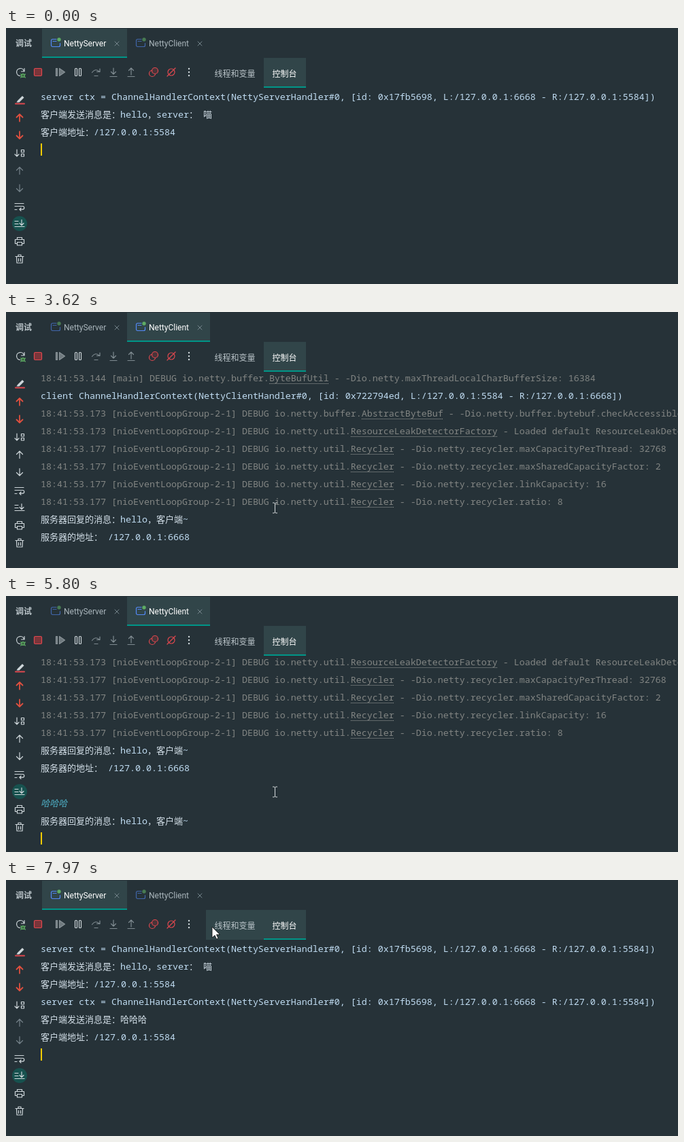
An HTML page that plays this animation: 988x377 px, repeating every 8 s.

```html
<!DOCTYPE html>
<html lang="zh-CN">
<head>
<meta charset="utf-8">
<style>
html, body { margin: 0; width: 100%; height: 100%; overflow: hidden; background: #263238; }
svg { position: absolute; left: 0; top: 0; fill: none; }
svg text { font: 12px Roboto, "Noto Sans CJK SC", sans-serif; fill: #bac4c9; }
#console { position: absolute; left: 0; top: 88px; width: 988px; height: 289px; overflow: hidden; }
.line { position: absolute; left: 51px; height: 26px; white-space: pre; color: #c0dcf2;
  font: 13.333px/26px "Noto Sans Mono", monospace; }
.line span { font: 13px/0 "Noto Sans CJK SC", sans-serif; color: #d3dfe8; }
.debug { color: #828583; }
.debug u { text-decoration: none;
  background: repeating-linear-gradient(90deg, #9a9d9b 0 1px, #0000 1px 2px) 0 100% / 100% 1px no-repeat; }
.typed span { color: #4fb0c6; font-style: italic; }
#caret { position: absolute; width: 2px; height: 18px; background: #fc0; }
#popup text { font-size: 14px; fill: #777; }
#popup text.word { font-size: 16px; fill: #333; }
#popup text.first { fill: #fff; }
</style>
</head>
<body>
<svg width="988" height="377" stroke-linecap="round" stroke-linejoin="round">
  <defs>
    <g id="run">
      <path d="M5.500 11.500H2.500a2 2 0 0 1-2-2v-7a2 2 0 0 1 2-2H8M13.500 6.500v3a2 2 0 0 1-2 2h-6M3 3.500h2M6 3.500h2" stroke="#548af7" stroke-width="1.200"/>
      <circle cx="12" cy="1" r="2.700" fill="#5fad65"/>
    </g>
    <path id="close" d="M-3-3 3 3M3-3-3 3" stroke="#76868d"/>
    <path id="up" d="M0 5.500V-5M-4.500-.500 0-5 4.500-.500"/>
    <path id="down" d="M0-5.500V5M-4.500.500 0 5 4.500.500"/>
  </defs>

  <text x="14" y="27" style="font-weight:600">调试</text>
  <g id="tabs">
    <g><rect x="53" y="1" width="125" height="43"/><path d="M53 43H178" stroke="#009688" stroke-width="2" stroke-linecap="butt"/>
      <use href="#run" x="66" y="16"/><text x="85" y="27">NettyServer</text><use href="#close" x="163" y="23"/></g>
    <g><rect x="178" y="1" width="122" height="43"/><path d="M178 43H300" stroke="#009688" stroke-width="2" stroke-linecap="butt"/>
      <use href="#run" x="191" y="16"/><text x="210" y="27">NettyClient</text><use href="#close" x="285" y="23"/></g>
  </g>
  <rect id="threads" x="294" y="44" width="85" height="44" fill="#314549"/>
  <rect x="379" y="44" width="62" height="44" fill="#314549"/>
  <rect x="379" y="86" width="62" height="2" fill="#009688"/>
  <text x="306.500" y="72">线程和变量</text>
  <text x="391.500" y="72" style="fill:#fff">控制台</text>

  <g stroke="#ced6da" stroke-width="1.200">
    <path d="M21 70.500a5.500 5.500 0 1 1 5.500-6.500M27 59.500V64h-4.500"/>
    <g stroke="#5fad65"><circle cx="25" cy="70" r="2.300" fill="#39633f"/><path d="M21.500 68l1.500 1M28.500 68l-1.500 1M21.500 73l1.500-1M28.500 73l-1.500-1"/></g>
    <rect x="41.500" y="59.500" width="11" height="11" rx="1.500" fill="#7a353a" stroke="#e0484f"/>
    <g stroke="#899398" fill="#6f797e"><path d="M73.500 59.500h2v11h-2zM78.500 59.500v11l8-5.500z"/></g>
    <rect x="101.500" y="59.500" width="3" height="11" rx="1"/><rect x="107.500" y="59.500" width="3" height="11" rx="1"/>
    <g stroke="#7f8b91">
      <path d="M126.500 65.500q5-7 11-1M138 60v4.500h-4.500M130 70.500h5M153 71.500h10M179 71.500h10"/>
      <path d="M158 59V68M154.500 64.500 158 68l3.500-3.500M184 69V59M180.500 62.500 184 59l3.500 3.500"/>
    </g>
    <g stroke="#e0484f"><circle cx="215" cy="67" r="4.500"/><circle cx="219" cy="63" r="4.500" fill="#4a3439"/>
      <circle cx="243" cy="65" r="5"/><path d="M237 71 249 59"/></g>
    <path d="M269 60v.010M269 65v.010M269 70v.010" stroke-width="2.400"/>

    <path d="M17 107 24 100l2.500 2.500-7 7h-4z" fill="#ced6da" stroke="none"/>
    <path d="M14 111.500h13" stroke="#e0484f" stroke-width="2"/>
    <g stroke="#e0503f" stroke-width="1.800"><use href="#up" x="20" y="132"/><use href="#down" x="20" y="158"/></g>
    <path d="M16 179v9.500M13 186l3 3 3-3M22.500 179.500h4v3.500h-4zM22.500 185.500h4v3.500h-4z"/>
    <g id="arrows"><use href="#up" x="20" y="210"/><use href="#down" x="20" y="236"/></g>
    <path d="M13 258.500h13M13 262.500h11.500a2.300 2.300 0 0 1 0 4.600H20M22 265l-2.200 2.100 2.200 2.100M13 267.500h3"/>
    <circle id="follow" cx="20" cy="288" r="11" fill="#17524f" stroke="none"/>
    <path d="M13 284.500h5M13 288.500h5M13 292.500h14M23 282.500v7.500M20 287.500l3 3 3-3"/>
    <path d="M16.500 311.500v-3h7v3M16.500 317.500h-3v-6h13v6h-3M16.500 315.500h7v4.500h-7z"/>
    <path d="M14 336.500h12M18 336v-2h4v2M15.500 337l.500 9h8l.500-9M18.500 339.500v4M21.500 339.500v4"/>
  </g>
</svg>

<div id="console"><div id="server"></div><div id="client"></div><div id="caret"></div></div>

<svg width="988" height="377">
  <g id="popup">
    <rect x="51" y="302" width="465" height="34" rx="8" fill="#fff" style="filter:drop-shadow(0 1px 2px #0008)"/>
    <g id="rows"></g>
    <path d="M459.500 317l4.500 4.500 4.500-4.500" stroke="#777" stroke-width="1.300"/>
    <path d="M480.500 310v18" stroke="#e6e6e6"/>
    <g stroke="#888" stroke-width="1.200"><circle cx="494" cy="315.500" r="2.400"/><circle cx="500.500" cy="315.500" r="2.400"/><circle cx="494" cy="322" r="2.400"/><circle cx="500.500" cy="322" r="2.400"/></g>
  </g>
  <path id="arrow" d="M0 0V16L4 12.500 6.500 18 9 17 6.500 11.500H11.500Z" fill="#fff" stroke="#111" stroke-width=".8"/>
  <path id="beam" d="M-3.500-7.500h2.500l1 1 1-1h2.500M0-6.500V6.500M-3.500 7.500h2.500l1-1 1 1h2.500" stroke="#d5dadc"/>
</svg>

<script>
const LOOP = 8000, ROW = 26;
const $ = id => document.getElementById(id);
const show = (el, on) => { el.style.display = on ? '' : 'none'; };

// Console text
const context = (head, name, id, from, to) =>
  `${head}ChannelHandlerContext(${name}#0, [id: ${id}, L:/127.0.0.1:${from} - R:/127.0.0.1:${to}])`;
const request = msg => [context('server ctx = ', 'NettyServerHandler', '0x17fb5698', 6668, 5584),
  '客户端发送消息是：' + msg, '客户端地址：/127.0.0.1:5584'];
const log = (ms, text, thread = 'nioEventLoopGroup-2-1') => `18:41:53.${ms} [${thread}] DEBUG io.netty.${text}`;
const recycler = text => log(177, 'util.Recycler - -Dio.netty.recycler.' + text);
const reply = ['服务器回复的消息：hello，客户端~', '服务器的地址： /127.0.0.1:6668'];

const serverText = [...request('hello，server： 喵'), ...request('哈哈哈')];
const clientText = [
  log(144, 'buffer.ByteBufUtil - -Dio.netty.maxThreadLocalCharBufferSize: 16384', 'main'),
  context('client ', 'NettyClientHandler', '0x722794ed', 5584, 6668),
  log(173, 'buffer.AbstractByteBuf - -Dio.netty.buffer.bytebuf.checkAccessible: true'),
  log(173, 'util.ResourceLeakDetectorFactory - Loaded default ResourceLeakDetector'),
  recycler('maxCapacityPerThread: 32768'), recycler('maxSharedCapacityFactor: 2'),
  recycler('linkCapacity: 16'), recycler('ratio: 8'),
  ...reply, '', '哈哈哈', ...reply];

function fill(box, lines) {
  box.innerHTML = lines.map((text, i) => {
    const debug = text.includes('DEBUG');
    if (debug) text = text.replace(/\w+(?= - )/, '<u>$&</u>');
    text = text.replace(/[\u3000-\uffef]+/g, '<span>$&</span>');
    const kind = debug ? 'debug' : lines[i] === '哈哈哈' ? 'typed' : '';
    return `<div class="line ${kind}" style="top:${i * ROW}px">${text}</div>`;
  }).join('');
}
fill($('server'), serverText);
fill($('client'), clientText);

// Input method candidates
const face = x => `<g transform="translate(${x} 319)"><circle r="8.500" fill="#ffc83d"/>
  <path d="M-5.500 1.500h11a5.500 5.500 0 0 1-11 0z" fill="#8a3b1d"/><path d="M-4.500 2h9v1.500h-9z" fill="#fff"/>
  <path d="M-5.500-2.500q2-2.500 4 0M1.500-2.500q2-2.500 4 0" stroke="#6b3a1a" stroke-width="1.200"/>
  <ellipse cx="-7.500" cy="2" rx="2" ry="3" fill="#4aa8ee"/><ellipse cx="7.500" cy="2" rx="2" ry="3" fill="#4aa8ee"/></g>
  <path d="M${x + 15} 317.500l2-2.500 2 2.500zM${x + 15} 320.500l2 2.500 2-2.500z" fill="#888"/>`;

function candidates(words) {
  let x = 61;
  const items = words.map((word, i) => {
    const cls = i ? '' : 'first';
    const item = `<text class="${cls}" x="${x}" y="324">${i + 1}</text>` +
      (word ? `<text class="word ${cls}" x="${x + 10}" y="325">${word}</text>` : face(x + 21));
    x += word ? 26 + 16 * word.length : 58;
    return item;
  });
  return `<g><rect x="55" y="306" width="${22 + 16 * words[0].length}" height="26" rx="5" fill="#0cb173"/>${items.join('')}</g>`;
}
$('rows').innerHTML = [
  ['哈', '和', '好', '会', '还'],
  ['哈哈', '哈哈哈哈', '嘿嘿嘿', '好好好', '呵呵呵呵'],
  ['哈哈哈', '', '好好好', '嘿嘿嘿', '呵呵呵']
].map(candidates).join('');

// Pointer: time, x, y
const path = [
  [180, 484, 6], [470, 270, 217], [1070, 270, 217], [1400, 196, 30], [1500, 199, 31], [1680, 199, 31],
  [1800, 208, 12], [1920, 216, 24], [2120, 216, 24], [2170, 219, 24], [2250, 219, 24], [2800, 300, 333],
  [2950, 309, 331], [3000, 309, 331], [3180, 395, 288], [6230, 395, 288], [6430, 369, 210],
  [6570, 369, 210], [6720, 278, 154], [7170, 130, 22], [7600, 130, 22], [7970, 303, 69], [LOOP, 303, 69]];

function pointerAt(t) {
  const i = path.findIndex(p => p[0] > t);
  if (i < 1) return [-99, -99];
  const [t0, x0, y0] = path[i - 1], [t1, x1, y1] = path[i], k = (t - t0) / (t1 - t0);
  return [Math.round(x0 + (x1 - x0) * k), Math.round(y0 + (y1 - y0) * k)];
}

const count = (times, t) => times.filter(x => t >= x).length;

// Caret: start, end, x, row on screen; client rows sit 4px higher
const carets = [
  [0, 430, 51, 3], [930, 1400, 51, 3], [1900, 2170, 51, 3],
  [2170, 2670, 90, 3], [2900, 3620, 269, 9], [3930, 4600, 51, 10], [5150, 5280, 51, 10],
  [5280, 5620, 90, 10], [5620, 6570, 51, 10], [7070, 7470, 51, 10], [7470, LOOP, 51, 6]];

function draw(t) {
  const client = t >= 2170 && t < 7470;
  const [x, y] = pointerAt(t);

  [...$('tabs').children].forEach((tab, i) => {
    const active = client == i;
    const over = y > 0 && y < 44 && (i ? x >= 178 && x < 300 : x >= 53 && x < 178);
    const [back, line, icon, label] = tab.children;
    back.setAttribute('fill', over ? '#425b67' : active ? '#314549' : 'none');
    show(line, active);
    icon.style.opacity = active ? 1 : .6;
    label.style.fill = active ? '#fff' : '#a9b5bb';
  });
  show($('threads'), x >= 294 && x < 379 && y >= 44 && y < 88);
  show($('follow'), !client || t >= 3930);
  $('arrows').style.stroke = client ? '#ced6da' : '#75828a';

  show($('server'), !client);
  show($('client'), client);
  [...$('server').children].forEach((el, i) => show(el, i < 3 || t >= 7470));
  const scroll = count([3930, 5620, 5800, 5850], t);
  [...$('client').children].forEach((el, i) => {
    el.style.top = (i - scroll) * ROW - 4 + 'px';
    show(el, i < 10 + scroll || i === 11 && t >= 5280);
  });

  const caret = carets.find(c => t >= c[0] && t < c[1]);
  show($('caret'), caret);
  if (caret) {
    $('caret').style.left = caret[2] + 'px';
    $('caret').style.top = caret[3] * ROW + (client ? 0 : 4) + 'px';
  }

  const typing = t >= 4600 && t < 5280;
  show($('popup'), typing);
  const stage = count([4780, 4920], t);
  [...$('rows').children].forEach((row, i) => show(row, i === stage));

  const beam = y > 88 && !typing;
  show($('arrow'), !beam);
  show($('beam'), beam);
  $('arrow').setAttribute('transform', `translate(${x} ${y})`);
  $('beam').setAttribute('transform', `translate(${x + .5} ${y + .5})`);
}

const start = performance.now();
function tick() {
  draw((performance.now() - start) % LOOP);
  requestAnimationFrame(tick);
}
tick();
</script>
</body>
</html>
```
